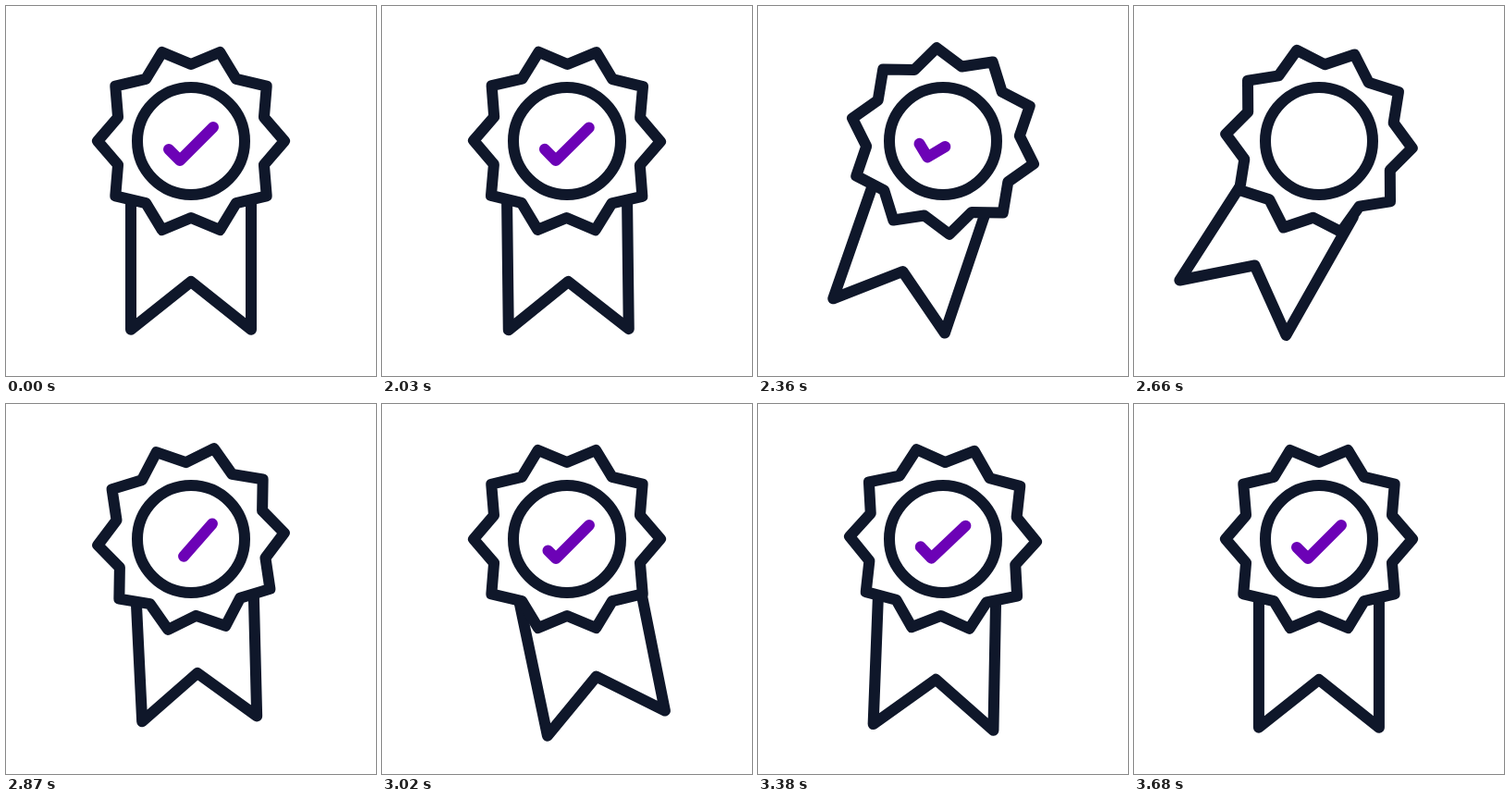
Write an HTML page that moves like this. It is 400 px wide and 400 px high and loops after 3.71 s.

```html
<!DOCTYPE html>
<html lang="en">
<head>
<meta charset="utf-8">
<title>Award rosette</title>
<style>
  html, body { margin: 0; width: 100%; height: 100%; overflow: hidden; background: #fff; }
  svg { display: block; width: 100%; height: 100%; }
  svg * { fill: none; stroke: #0f172a; stroke-width: 12; stroke-linecap: round; stroke-linejoin: round; }
  #rosette { fill: #fff; }
  #check { stroke: #6c02b6; }
</style>
</head>
<body>
<svg viewBox="0 0 400 400">
  <polyline id="ribbon"/>
  <g id="badge">
    <polygon id="rosette"/>
    <path id="check"/>
  </g>
  <circle cx="200" cy="146" r="58"/>
</svg>
<script>
const LOOP = 3710;
const CX = 200, CY = 146;
const [ribbon, badge, rosette, check] =
  ['ribbon', 'badge', 'rosette', 'check'].map(id => document.getElementById(id));

const clamp = u => Math.min(1, Math.max(0, u));
const progress = (t, from, to) => clamp((t - from) / (to - from));
const swing = u => (1 - Math.cos(Math.PI * u)) / 2;
const lerp = (a, b, k) => a + (b - a) * k;

// Turns an offset from the centre clockwise by deg.
function turn([x, y], deg) {
  const a = deg * Math.PI / 180, c = Math.cos(a), s = Math.sin(a);
  return [CX + x * c - y * s, CY + x * s + y * c];
}

// Finds the keys around t and the eased position between them.
function segment(keys, t) {
  let i = 1;
  while (i < keys.length - 1 && t > keys[i].t) i++;
  const a = keys[i - 1], b = keys[i];
  return { a, b, k: swing(progress(t, a.t, b.t)) };
}

const badgeKeys = [[1990, 0], [2430, 15], [2855, -3.8], [3170, 3.1], [3590, 0]]
  .map(([t, deg]) => ({ t, deg }));

// The ribbon's corners move in straight lines between turned poses;
// its two top ends stay tucked under the rosette.
const ribbonKeys = [
  [2015, 0, [135, 205], [265, 205]],
  [2030, -0.5, [135, 205], [265, 205]],
  [2605, 28, [115, 193], [236, 229]],
  [2630, 28, [115, 193], [236, 229]],
  [2990, -12.3, [149, 215], [278, 190]],
  [3350, 3, [130, 203], [257, 208]],
  [3700, 0, [135, 205], [265, 205]]
].map(([t, deg, left, right]) => ({
  t,
  points: [left, ...[[-65, 203.7], [0, 152], [65, 203.7]].map(p => turn(p, deg)), right]
}));

rosette.setAttribute('points', Array.from({ length: 20 }, (_, i) =>
  turn([i % 2 ? 83 : 101, 0], i * 18)).join(' '));

const tick = [[176, 155], [188, 167], [224, 131]];
const shortArm = Math.hypot(12, 12), tickLength = shortArm + Math.hypot(36, 36);

function along(d) {
  const [a, b, c] = tick;
  const [p, q, k] = d < shortArm
    ? [a, b, d / shortArm]
    : [b, c, (d - shortArm) / (tickLength - shortArm)];
  return [lerp(p[0], q[0], k), lerp(p[1], q[1], k)];
}

// The tick is wiped from its tip, then grows back from the same end.
function drawCheck(t) {
  const start = t < 2640 ? 0 : tickLength * (1 - progress(t, 2685, 3260)) ** 3;
  const end = t < 2640 ? tickLength * (1 - progress(t, 2000, 2600) ** 1.7) : tickLength;
  const visible = end - start > 0.01;
  check.style.display = visible ? '' : 'none';
  if (!visible) return;
  const points = [along(start), along(end)];
  if (start < shortArm && end > shortArm) points.splice(1, 0, tick[1]);
  check.setAttribute('d', 'M' + points.join('L'));
}

function draw(t) {
  const spin = segment(badgeKeys, t);
  badge.setAttribute('transform', `rotate(${lerp(spin.a.deg, spin.b.deg, spin.k)} ${CX} ${CY})`);
  const { a, b, k } = segment(ribbonKeys, t);
  ribbon.setAttribute('points', a.points.map((p, i) =>
    p.map((v, axis) => lerp(v, b.points[i][axis], k))).join(' '));
  drawCheck(t);
}

const begin = performance.now();
function frame() {
  draw((performance.now() - begin) % LOOP);
  requestAnimationFrame(frame);
}
frame();
</script>
</body>
</html>
```
